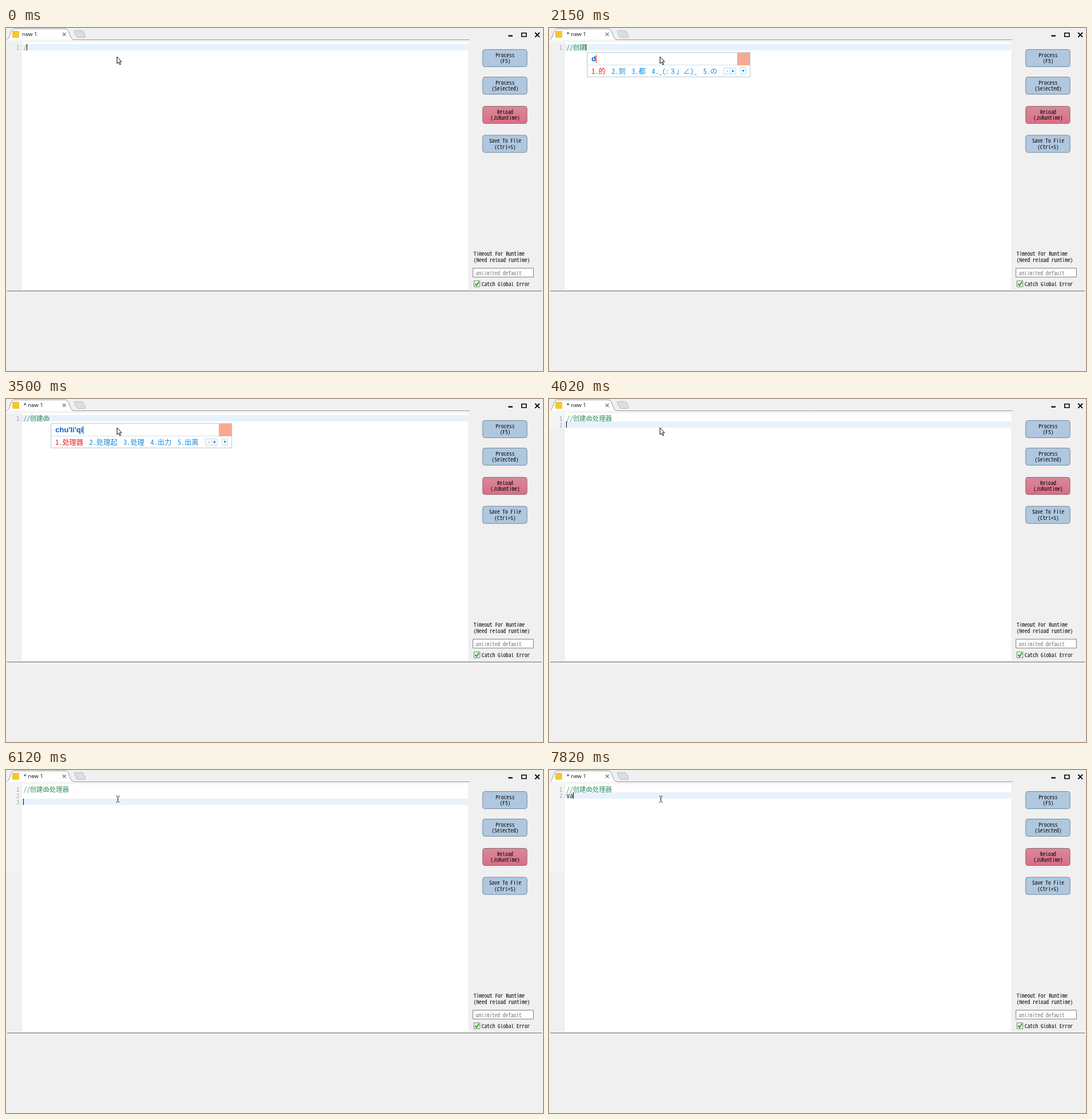
Animation, 936 px wide and 598 px high, one loop 8 s. Source, as an HTML page with a canvas:

```html
<!DOCTYPE html>
<html lang="zh-CN">
<head>
<meta charset="utf-8">
<title>Script editor</title>
<style>
html, body { margin: 0; width: 100%; height: 100%; overflow: hidden; background: #f0f0f0; }
canvas { display: block; }
</style>
</head>
<body>
<canvas id="stage" width="936" height="598"></canvas>
<script>
const ctx = document.getElementById('stage').getContext('2d');
const LOOP = 8000;
const MONO = '"Noto Sans Mono CJK SC", "Noto Sans Mono", monospace';
const UI = '"Open Sans", "Noto Sans", sans-serif';
const BOLD = 'bold 13px "Liberation Sans", Arial, sans-serif';

// Mono font whose Latin letters advance by the given width
ctx.font = '100px ' + MONO;
const unit = ctx.measureText('0').width / 100;
const mono = advance => `${advance / unit}px ${MONO}`;
const CODE = mono(5.65), LABEL = mono(4.68), CAND = mono(6.1);

const GREEN = '#2e8b57', BLUE = '#0b8be6';

const menu = (x, pinyin, words, bar = '#2a4a86') => ({ x, pinyin, words: words.split(' '), bar });
const tips = (right, bottom) => ({ right, bottom });

// Each step changes part of the state and keeps the rest
const steps = [
  [0, { title: 'new 1', tx: 28, lines: ['/'], color: '#b8672a', last: '#222', caret: true,
        menu: null, tips: null, beam: false, pale: 0 }],
  [130, { lines: ['//'], color: GREEN }],
  [680, { title: '* new 1', tx: 30.5, caret: false }],
  [950, { menu: menu(43, 'c', '次 从 才 草 错') }],
  [1080, { menu: menu(43, 'ch', '吃 成 出 车 长'), caret: true }],
  [1230, { menu: menu(43, 'chu', '出 处 除 畜 ÷') }],
  [1360, { menu: menu(43, 'chuan', '穿 传 船 川 串') }],
  [1640, { menu: menu(43, "chuang'j", '创建 创举 床具 窗景 创界'), caret: false }],
  [1910, { menu: menu(43, "chuang'jian", '创建 创见 窗间 床间 创') }],
  [2030, { lines: ['//创建'], menu: null, caret: true }],
  [2150, { menu: menu(66, 'd', '的 到 都 _(:３」∠)_ の', '#e22') }],
  [2270, { menu: menu(66, "d'b", '代表 大部 电报 达标 db') }],
  [2550, { menu: menu(66, 'db', '代表 大部 电报 达标 db'), caret: false }],
  [2700, { lines: ['//创建db'], menu: null, caret: true }],
  [2820, { menu: menu(78, 'ch', '吃 成 出 车 长') }],
  [2940, { menu: menu(78, 'chu', '出 处 除 畜 ÷') }],
  [3220, { menu: menu(78, "chu'l", '处理 出来 出路 出力 初六'), caret: false }],
  [3350, { menu: menu(78, "chu'li", '处理 出力 出离 初历 矗立') }],
  [3500, { menu: menu(78, "chu'li'qi", '处理器 处理起 处理 出力 出离') }],
  [3630, { menu: null }],
  [3770, { lines: ['//创建db处理器'], caret: true }],
  [4020, { lines: ['//创建db处理器', ''], pale: 50 }],
  [4300, { tips: tips(115, 163), beam: true }],
  [4450, { tips: tips(115, 167), pale: 179 }],
  [4570, { caret: false }],
  [4720, { tips: tips(122, 167) }],
  [5130, { tips: null, caret: true }],
  [5590, { caret: false }],
  [6120, { lines: ['//创建db处理器', '', ''], caret: true }],
  [6400, { lines: ['//创建db处理器', '', 'va'] }],
  [6680, { lines: ['//创建db处理器', '', 'var'], last: '#1b45d6' }],
  [6960, { lines: ['//创建db处理器', '', 'va'], last: '#222' }],
  [7080, { lines: ['//创建db处理器', '', 'v'] }],
  [7230, { lines: ['//创建db处理器', '', ''] }],
  [7660, { lines: ['//创建db处理器', ''] }],
  [7820, { lines: ['//创建db处理器', 'va'] }]
];

function stateAt(t) {
  const s = {};
  for (const [at, change] of steps) if (at <= t) Object.assign(s, change);
  return s;
}

function text(str, x, y, font, color, align = 'left') {
  ctx.font = font;
  ctx.fillStyle = color;
  ctx.textAlign = align;
  ctx.textBaseline = 'middle';
  ctx.fillText(str, x, y);
  return ctx.measureText(str).width;
}

function rect(x, y, w, h, color) {
  ctx.fillStyle = color;
  ctx.fillRect(x, y, w, h);
}

function frame(x, y, w, h, fill, stroke, r = 0) {
  ctx.beginPath();
  ctx.roundRect(x + .5, y + .5, w - 1, h - 1, r);
  paint(fill, stroke);
}

function paint(fill, stroke, width = 1) {
  if (fill) { ctx.fillStyle = fill; ctx.fill(); }
  if (stroke) { ctx.strokeStyle = stroke; ctx.lineWidth = width; ctx.stroke(); }
}

function shape(d, fill, stroke, width) {
  const p = new Path2D(d);
  if (fill) { ctx.fillStyle = fill; ctx.fill(p); }
  if (stroke) { ctx.strokeStyle = stroke; ctx.lineWidth = width || 1; ctx.stroke(p); }
}

function button(y, top, bottom, red) {
  let fill = '#b0c8df';
  if (red) {
    fill = ctx.createLinearGradient(0, y, 0, y + 31);
    fill.addColorStop(0, '#d78a9a');
    fill.addColorStop(1, '#dd6c85');
  }
  frame(830.4, y, 78.2, 31, fill, red ? '#8f6a74' : '#75899c', 4);
  text(top, 870, y + 10, LABEL, '#000', 'center');
  text(bottom, 870, y + 20.5, LABEL, '#000', 'center');
}

function drawWindow(s) {
  rect(0, 0, 936, 598, '#f0f0f0');
  rect(0, 21, 806, 4, '#f5f5f5');
  rect(27, 25, 778.5, 431, '#fff');
  if (s.pale) rect(0, 24, 26, s.pale - 24, '#f4f4f4');
  rect(26, 25, 1, 431, '#e4e4e4');
  rect(2, 458, 932, 1, '#6e6e6e');

  // Tabs
  const tab = 'M2 20.5 Q4.5 19 6.5 13 L9.5 5 Q11 1.5 14.5 1.5 H103 Q107 1.5 108.5 5 L113 16 Q115 20.5 119 20.5';
  shape(tab, '#fff');
  shape(tab + ' H808', null, '#9a9a9a');
  shape('M121 4.5 H132 Q134 4.5 135 6.5 L138.5 14 Q139 16.5 136.5 16.5 H126 Q123.5 16.5 122.5 14 L119 7 Q118 4.5 121 4.5 Z', '#d6dfe6', '#b4c0c9');
  rect(11, 5, 12, 12, '#f5c535');
  text(s.title, s.tx, 11, '9.6px ' + UI, '#111');
  shape('M98.7 8.2 L104.3 13.8 M104.3 8.2 L98.7 13.8', null, '#666', 1.2);

  // Window controls
  rect(875.5, 12.5, 7.5, 2.3, '#000');
  shape('M898.8 8.8 H906.8 V15 H898.8 Z', null, '#000', 1.6);
  shape('M922.2 8 L930 15.8 M930 8 L922.2 15.8', null, '#000', 1.8);

  // Side panel
  button(37, 'Process', '(F5)');
  button(85, 'Process', '(Selected)');
  button(136, 'Reload', '(JsRuntime)', true);
  button(186.5, 'Save To File', '(Ctrl+S)');
  text('Timeout For Runtime', 815, 393, LABEL, '#000');
  text('(Need reload runtime)', 815, 404, LABEL, '#000');
  frame(813.4, 418.3, 106.4, 16.4, '#fff', '#7a7a7a');
  text('unlimited default', 819, 427, LABEL, '#777');
  frame(815.2, 440.4, 11.2, 11.2, '#fff', '#5c7c74');
  shape('M817.6 445.5 L820.2 448.9 L824.2 442.6', null, '#35a51e', 2.2);
  text('Catch Global Error', 829, 446, LABEL, '#000');
}

function drawCode(s) {
  const row = s.lines.length - 1;
  const top = 28 + row * 11;
  rect(27, top, 778.5, 11, '#e8f2fd');
  s.lines.forEach((line, i) => {
    const y = 33.7 + i * 10.8;
    text(i + 1, 18, y, CODE, '#a8a8a8');
    text(line, 30.5, y, CODE, i ? s.last : s.color);
  });
  if (s.caret) {
    ctx.font = CODE;
    rect(Math.floor(30.9 + ctx.measureText(s.lines[row]).width), top, 1, 11, '#000');
  }
}

function badge(right, y) {
  rect(right - 23, y, 22, 22, '#f7a98f');
}

function arrow(x, y, dx, dy, color) {
  ctx.beginPath();
  ctx.moveTo(x + dx, y + dy);
  ctx.lineTo(x - dx + dy * 1.25, y - dy + dx * 1.25);
  ctx.lineTo(x - dx - dy * 1.25, y - dy - dx * 1.25);
  paint(color);
}

function drawMenu({ x, pinyin, words, bar }) {
  const items = words.map((w, i) => `${i + 1}.${w}`);
  ctx.font = CAND;
  const widths = items.map(w => ctx.measureText(w).width);
  const end = widths.reduce((sum, w) => sum + w, x + 8 + 42.4);
  const right = Math.round(end + 58);
  frame(x, 42.3, right - x, 43.4, '#fff', '#b0c8d9');
  rect(x + 1, 64, right - x - 2, 1, '#d3e0ea');
  badge(right, 43);
  const w = text(pinyin, x + 8, 54, BOLD, '#0a5ec9');
  rect(Math.floor(x + 8.4 + w), 47, 1, 14, bar);

  let cx = x + 8;
  items.forEach((item, i) => {
    text(item, cx, 75, CAND, i ? BLUE : '#f01818');
    cx += widths[i] + 10.6;
  });
  frame(right - 47, 69, 22, 12, '#f8fcff', '#c3dcee');
  rect(right - 36, 70, 1, 10, '#c3dcee');
  arrow(right - 41, 75, -1.5, 0, '#a9c6dc');
  arrow(right - 30, 75, 1.9, 0, '#0878d0');
  frame(right - 18, 69, 11, 12, '#f8fcff', '#c3dcee');
  arrow(right - 12.5, 75, 0, 1.8, '#0878d0');
}

function drawTips({ right, bottom }) {
  frame(-2, 53, right + 2, bottom - 53, '#fff', '#b0c8d9');
  badge(right, 54);
  const color = '#0a62d4';
  ['v123', 'v2013/1/1', 'v1+1', 'v2^3'].forEach((v, i) =>
    text(`(如: ${v})`, 2, 84 + i * 13.2, LABEL, color));
  const w = text('查看函数列表', 58, 123.6, LABEL, color);
  rect(58, 128, w, 1, color);
}

function drawPointer(beam) {
  if (beam) {
    shape('M192 45.5 H194 M196 45.5 H198 M195 46 V55.5 M192 56 H194 M196 56 H198', null, '#222', 1.2);
  } else {
    shape('M193.5 50 V62 L196.2 59.5 L198.2 64 L200 63.2 L198 58.8 H201.5 Z', '#fff', '#111');
  }
}

function draw() {
  const s = stateAt(performance.now() % LOOP);
  drawWindow(s);
  drawCode(s);
  if (s.menu) drawMenu(s.menu);
  if (s.tips) drawTips(s.tips);
  drawPointer(s.beam);
  requestAnimationFrame(draw);
}
draw();
</script>
</body>
</html>
```
